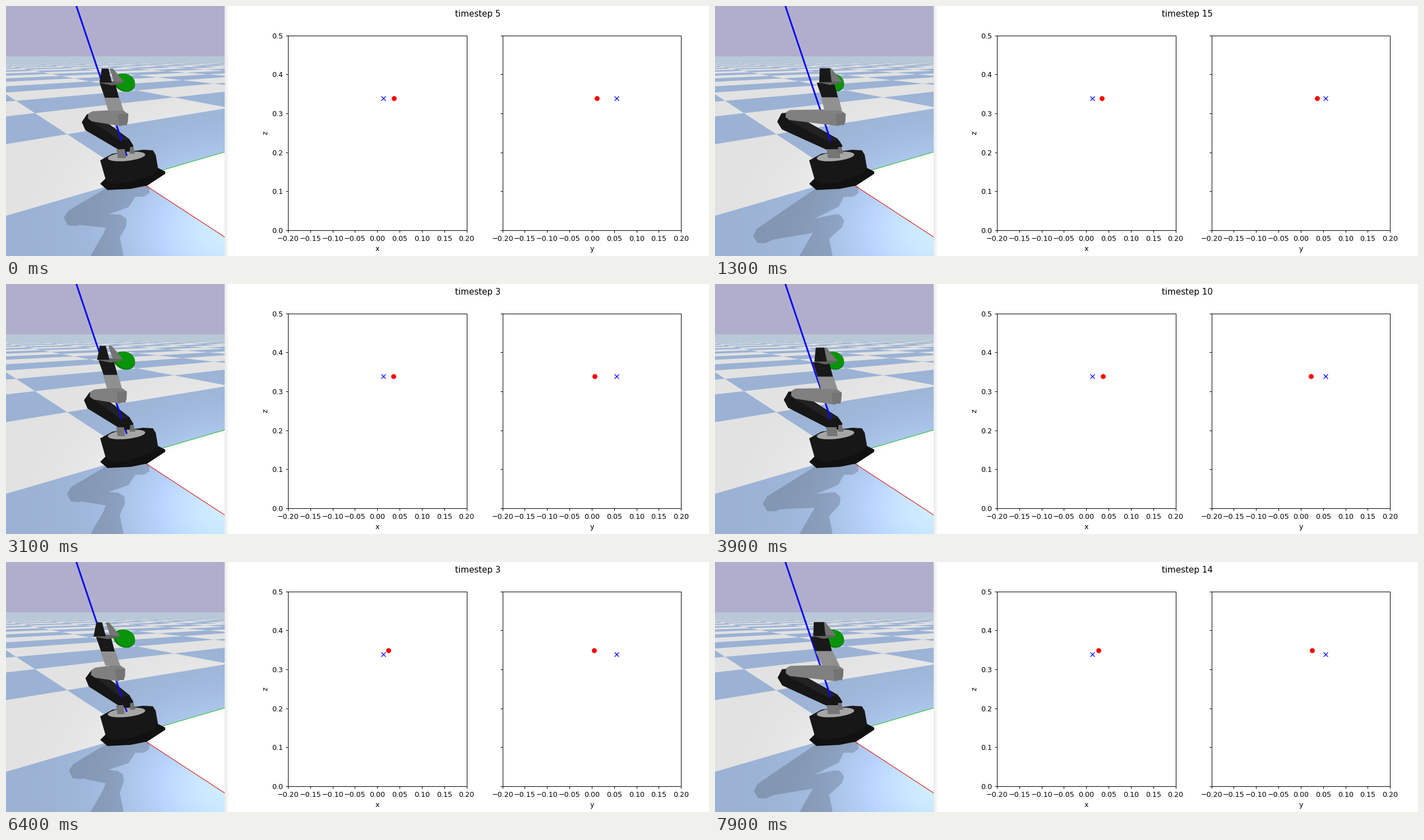
Recreate the animation shown at these times as a matplotlib script. Size 1254 by 447 pixels, loop 8000 ms.

```python
import itertools

import matplotlib.pyplot as plt
import numpy as np
from matplotlib.animation import FuncAnimation
from matplotlib.patches import Ellipse, PathPatch
from matplotlib.path import Path

W, H, SPLIT = 1254, 447, 390
FRAMES, STEPS = 80, 25
K = 0.905  # plot scale relative to 100 dpi

plt.rcParams.update({
    "font.family": "DejaVu Sans", "font.size": 10 * K,
    "axes.linewidth": 0.8 * K, "axes.labelpad": 4 * K,
    "xtick.major.size": 3.5 * K, "ytick.major.size": 3.5 * K,
    "xtick.major.width": 0.8 * K, "ytick.major.width": 0.8 * K,
    "xtick.major.pad": 3.5 * K, "ytick.major.pad": 3.5 * K,
})

fig = plt.figure(figsize=(W / 100, H / 100), dpi=100, facecolor="white")
scene = fig.add_axes([0, 0, 1, 1])
scene.set_axis_off()
order = itertools.count(1)


def gray(v):
    return (v / 255,) * 3


# ---------- floor and sky ----------

def render_floor(ss=4):
    """Perspective checkerboard from two vanishing points and the world origin."""
    far_a, far_b, origin = (-111, 85, 1), (992, 85, 1), (229.5, 308, 1)
    to_tile = np.linalg.inv(np.column_stack([
        0.5465 * np.array(far_a), 0.75 * np.array(far_b), origin]))
    x, y = np.meshgrid((np.arange(SPLIT * ss) + 0.5) / ss,
                       (np.arange(H * ss) + 0.5) / ss)
    u, v, w = (r[0] * x + r[1] * y + r[2] for r in to_tile)
    w = np.where(np.abs(w) < 1e-9, 1e-9, w)
    odd = (np.floor(u / w) + np.floor(v / w)) % 2
    odd = odd.reshape(H, ss, SPLIT, ss).mean(axis=(1, 3))

    y, x = np.mgrid[0:H, 0:SPLIT] + 0.5
    blue, white = np.array([155, 178, 212]), np.array([226, 226, 226])
    tiles = blue + odd[..., None] * (white - blue)
    glow = np.exp(-((x - 400) / 170) ** 2 - ((y - 400) / 130) ** 2)
    tiles = tiles * (1 + 0.34 * glow[..., None])
    near = np.clip((y - 99) / 8, 0, 1)[..., None]
    img = near * tiles + (1 - near) * np.array([184, 200, 214])
    img[:90] = (177, 174, 205)
    return np.clip(img, 0, 255).astype(np.uint8)


scene.imshow(render_floor(), extent=(0, SPLIT, H, 0), aspect="auto",
             interpolation="nearest", zorder=0)
# soft edge of the viewer window
scene.imshow(np.linspace(234, 255, 9)[None], extent=(SPLIT, SPLIT + 9, H, 0),
             aspect="auto", cmap="gray", vmin=0, vmax=255, zorder=0)
scene.set_xlim(0, W)
scene.set_ylim(H, 0)


# ---------- shapes ----------

def limb(p, q, a, b):
    """Bevelled bar between joints p and q with half widths a and b."""
    p, q = np.array(p, float), np.array(q, float)
    t = (q - p) / np.hypot(*(q - p))
    n = np.array([-t[1], t[0]])
    return np.array([p + n * a, p - t * a * 0.8 + n * a * 0.5,
                     p - t * a * 0.8 - n * a * 0.5, p - n * a,
                     q - n * b, q + t * b * 0.8 - n * b * 0.5,
                     q + t * b * 0.8 + n * b * 0.5, q + n * b])


def slab(p, q, a, b):
    """Four-sided block with level ends of half widths a and b."""
    return np.array([(p[0] - a, p[1]), (p[0] + a, p[1]),
                     (q[0] + b, q[1]), (q[0] - b, q[1])])


def outline(*polys):
    closed = [np.vstack([p, p[:1]]) for p in polys]
    return Path.make_compound_path(*[Path(p, closed=True) for p in closed])


def shape(path, color, **kw):
    return scene.add_patch(PathPatch(path, fc=color, ec="none",
                                     zorder=next(order), **kw))


def stroke(x, y, color, width):
    scene.plot(x, y, color=color, lw=width * 0.72, zorder=next(order),
               solid_capstyle="butt")


def oval(x, y, w, h, angle, color):
    scene.add_patch(Ellipse((x, y), w, h, angle=angle, fc=color, ec="none",
                            zorder=next(order)))


# ---------- arm ----------

# joints at swing 0, MID and 1
MID = 0.43
JOINTS = {
    "elbow": [(175, 212), (151, 208), (120, 205)],
    "knuckle": [(190, 192), (206, 200), (225, 198)],
    "palm": [(176, 149), (189, 164), (210, 160)],
    "elbow_shade": [(150, 368), (117, 380), (72, 424)],
    "knuckle_shade": [(180, 388), (203, 386), (220, 385)],
}
SHOULDER = np.array([213, 249])


def joints(s):
    """Quadratic path of every joint through its three key places."""
    basis = np.array([(s - MID) * (s - 1) / MID,
                      s * (s - 1) / (MID * (MID - 1)),
                      s * (s - MID) / (1 - MID)])
    return {name: basis @ np.array(keys) for name, keys in JOINTS.items()}


def pose(swing, lean):
    j = joints(swing)
    tilt = lean * np.array([-12, -5])
    elbow = j["elbow"]
    knuckle = j["knuckle"] + 0.3 * tilt
    palm = j["palm"] + 0.85 * tilt
    crown = palm + (-8, -26)
    half = 12 + 4 * swing
    jaw_l = crown + (-29 * (1 - swing) ** 4, -1)
    jaw_r = crown + (21, -2)
    fore = elbow + 0.1 * (knuckle - elbow) + (-3, -10)
    bend = (188, 410)
    shade = [limb((190, 329), (246, 329), 12, 12),
             limb((208, 337), j["elbow_shade"], 25, 15),
             limb(j["elbow_shade"], j["knuckle_shade"], 10, 13),
             limb(j["knuckle_shade"], bend, 14, 15),
             limb(bend, (180, 460), 15, 34)]
    lug = np.array([199 + 13 * swing, 256])
    polys = {
        "arm": limb(elbow, SHOULDER, 17, 13),
        "arm_top": limb(elbow + (7, -7), SHOULDER + (2, -6), 7, 5),
        "lug_l": slab(lug, lug + (2, 16), 4 + 8 * swing, 4 + 8 * swing),
        "lug_r": slab((226 - 4 * swing, 252), (227 - 4 * swing, 264), 3, 5),
        "forearm": limb(fore, knuckle, 9, 15),
        "face": slab(knuckle + (3, -7), knuckle + (3, 13), 9, 7),
        "wrist": slab(palm, knuckle + (-10, -13), half, half),
        "hand": slab(crown, palm, half, half - 1),
        "bar": np.array([jaw_l + (-13, 0), crown + (8, -4),
                         jaw_r + (11, 2), crown + (8, 4)]),
        "jaw_l": slab(jaw_l + (-1, -25), jaw_l, 3 + 7 * swing, 11),
        "jaw_r": slab(jaw_r + (-14, -24), jaw_r, 3, 9),
    }
    return {"shade": outline(*shade),
            **{name: outline(p) for name, p in polys.items()}}


start = pose(MID, 0)
patches = {}


def part(name, color, **kw):
    patches[name] = shape(start[name], color, **kw)


stroke([229.5, SPLIT], [308, 261], (0.2, 0.78, 0.25), 1.2)
stroke([229.5, SPLIT], [308, 413], (0.86, 0.15, 0.15), 1.2)
part("shade", "black", alpha=0.165)

# base
shape(outline(np.array([(168, 318), (180, 306), (264, 286), (284, 296), (284, 300),
                        (252, 321), (222, 327), (181, 329)])), gray(17))
shape(outline(np.array([(168, 276), (190, 264), (245, 257), (262, 258), (267, 266),
                        (271, 289), (262, 301), (220, 315), (190, 318),
                        (178, 311)])), gray(23))
oval(215, 269, 67, 16, -6, gray(166))

# ball
oval(211, 137, 40, 31, 24, (0.03, 0.5, 0.03))
oval(213, 136, 35, 29, 24, (0.04, 0.58, 0.04))

part("arm", gray(22))
part("arm_top", gray(34))
stroke([125.5, 215.5], [0, 268], (0.05, 0.03, 0.93), 3)
shape(outline(limb(SHOULDER, SHOULDER + (4, 2), 11, 11)), gray(22))
part("lug_l", gray(118))
part("lug_r", gray(112))
part("forearm", gray(128))
part("face", gray(116))
part("wrist", gray(144))
part("jaw_r", gray(116))
part("hand", gray(25))
part("bar", gray(98))
part("jaw_l", gray(25))

# ---------- plots ----------


def panel(left, label, goal):
    ax = fig.add_axes([left / W, 1 - 401 / H, 318.7 / W, 348.2 / H])
    ax.set(xlim=(-0.2, 0.2), ylim=(0, 0.5), xlabel=label)
    ax.set_xticks(np.arange(-4, 5) * 0.05)
    ax.set_yticks(np.arange(6) * 0.1)
    style = dict(ms=6 * K, mew=K, ls="none")
    ax.plot([goal], [0.339], "x", color="blue", **style)
    dot, = ax.plot([0], [0], "o", color="red", **style)
    return ax, dot


ax_x, dot_x = panel(502.9, "x", 0.0135)
ax_y, dot_y = panel(885.6, "y", 0.0558)
ax_x.set_ylabel("z")
ax_y.tick_params(labelleft=False)
title = fig.text(842.1 / W, 1 - 7.4 / H, "", ha="center", va="top", fontsize=12 * K)

# ---------- motion ----------


def clock(frame):
    """Running step count with one short stall."""
    return np.interp(frame, [0, 41, 43, 79], [5.3, 36.55, 36.55, 64.85])


def reach(s):
    """Swing and lean; the arm snaps to rest a little before the counter restarts."""
    lead = 3.5
    run, since = divmod(s + lead, STEPS)
    t = (since - 1) / 21
    t = max(t, 0)
    swing = t + 0.06 * np.sin(np.pi * t)
    lean = 1.2 * t if run >= 2 else 0
    return swing, lean


def tip(s):
    run, n = divmod(int(s), STEPS)
    if run == 2:
        return 0.0243 + 0.00023 * n, 0.0018 * n, 0.3495
    x = 0.0375 - 0.00006 * (n - 8) ** 2
    y = min(0.00205 * n + 0.000026 * n * n, 0.057)
    return x, y, 0.339


def update(frame):
    s = clock(frame)
    for name, path in pose(*reach(s)).items():
        patches[name].set_path(path)
    x, y, z = tip(s)
    dot_x.set_data([x], [z])
    dot_y.set_data([y], [z])
    title.set_text(f"timestep {int(s) % STEPS}")
    return [*patches.values(), dot_x, dot_y, title]


ani = FuncAnimation(fig, update, frames=FRAMES, interval=100, repeat=True,
                    repeat_delay=0, blit=False)
plt.show()
```
